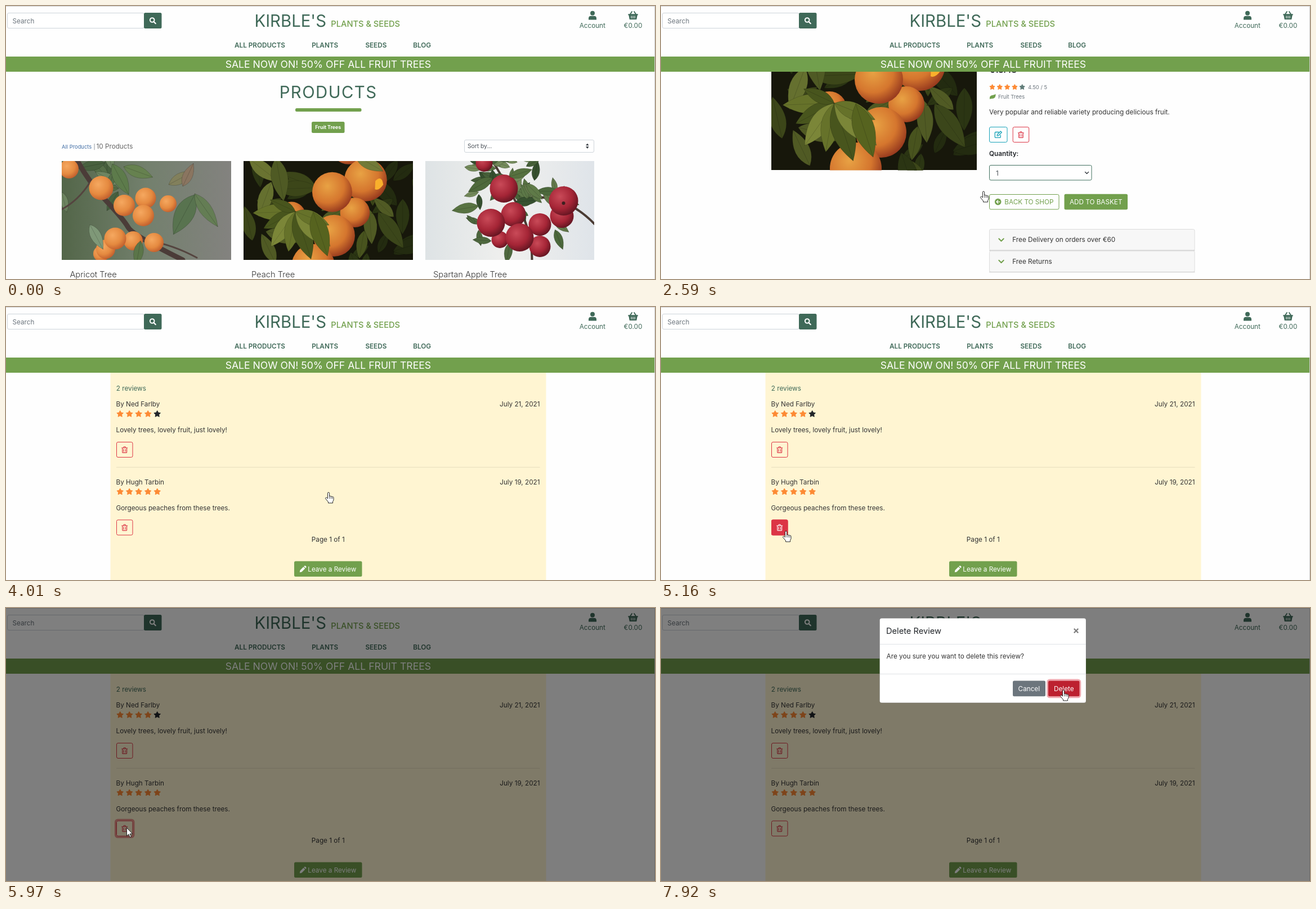
An HTML page that plays this animation: 1153 px wide and 486 px high, repeating every 7990 ms.

```html
<!DOCTYPE html>
<html lang="en">
<head>
<meta charset="utf-8">
<title>Plant shop</title>
<style>
html, body { margin: 0; width: 100%; height: 100%; overflow: hidden; background: #fefefe; }
svg { display: block; }
text { font-family: Inter, sans-serif; font-optical-sizing: none; white-space: pre; }
</style>
</head>
<body>
<svg id="stage" width="1153" height="486"></svg>
<script>
const LOOP = 7990, GREEN = '#72a04d', DARK = '#3f6958', RED = '#dc3545', GREY = '#6c757d', INK = '#333', ORANGE = '#fd8a34';

// ---- drawing helpers ----
const text = (x, y, s, fill = INK, size = 11.73, more = '') =>
  `<text x="${x}" y="${y}" fill="${fill}" font-size="${size}" ${more}>${s}</text>`;
const MID = 'text-anchor="middle"', END = 'text-anchor="end"';
const weight = w => `font-weight="${w}"`;
const rect = (x, y, w, h, fill, r = 0, more = '') =>
  `<rect x="${x}" y="${y}" width="${w}" height="${h}" rx="${r}" fill="${fill}" ${more}/>`;
const box = (x, y, w, h, line, fill = 'none') => rect(x + .5, y + .5, w - 1, h - 1, fill, 2.5, `stroke="${line}"`);
const line = (d, color, w = 1.2, more = '') =>
  `<path d="${d}" fill="none" stroke="${color}" stroke-width="${w}" stroke-linecap="round" stroke-linejoin="round" ${more}/>`;
const shape = (d, fill, more = '') => `<path d="${d}" fill="${fill}" ${more}/>`;
const group = (id, body, more = '') => `<g id="${id}" ${more}>${body}</g>`;
const photo = (x, y, w, h, view, body) =>
  `<svg x="${x}" y="${y}" width="${w}" height="${h}" viewBox="${view}" preserveAspectRatio="xMidYMid slice">${body}</svg>`;

const star = (x, y, r, fill) => {
  let d = '';
  for (let i = 0; i < 10; i++) {
    const a = (i / 5 - .5) * Math.PI, q = i % 2 ? r * .52 : r;
    d += `${i ? 'L' : 'M'}${(x + q * Math.cos(a)).toFixed(2)} ${(y + q * Math.sin(a)).toFixed(2)}`;
  }
  return shape(d + 'z', fill, `stroke="${fill}" stroke-linejoin="round"`);
};
const stars = (x, y, gap, r, full, rest) =>
  [0, 1, 2, 3, 4].map(i => star(x + i * gap, y, r, i < full ? ORANGE : rest)).join('');
const bin = (x, y, color) =>
  line(`M${x - 5} ${y - 3.3}h10M${x - 2} ${y - 3.3}l.7-1.9h2.6l.7 1.9M${x - 3.9} ${y - 3}v7.4q0 1 1 1h5.8q1 0 1-1v-7.4M${x - 1.7} ${y - .8}v4M${x + 1.7} ${y - .8}v4`, color, 1.1);
const binButton = (x, y) => box(x, y, 29.5, 28, RED) + bin(x + 14.7, y + 14, RED);

// ---- photographs as simple shapes ----
let seed = 7;
const rnd = () => (seed = seed * 16807 % 2147483647) / 2147483647;
const leaf = (x, y, l, a, c, w = l * .38) =>
  `<path transform="translate(${x} ${y})rotate(${a})" d="M0 0Q${l * .4} ${-w} ${l} 0Q${l * .4} ${w} 0 0H${l}" fill="${c}" stroke="#0003" stroke-width=".8"/>`;
const scatter = (n, x, y, w, h, len, colors) => {
  let s = '';
  while (n--) s += leaf(x + rnd() * w, y + rnd() * h, len * (.6 + rnd() * .6), rnd() * 360, colors[n % colors.length]);
  return s;
};
const fruit = (kind, list) => list.map(([x, y, r]) => `<circle cx="${x}" cy="${y}" r="${r}" fill="url(#${kind})"/>`).join('');
const radial = (id, a, b, c) =>
  `<radialGradient id="${id}" cx=".38" cy=".35" r=".7"><stop stop-color="${a}"/><stop offset=".6" stop-color="${b}"/><stop offset="1" stop-color="${c}"/></radialGradient>`;
const across = (id, a, b, c) =>
  `<linearGradient id="${id}"><stop stop-color="${a}"/><stop offset=".5" stop-color="${b}"/><stop offset="1" stop-color="${c}"/></linearGradient>`;

const apricots = rect(0, 0, 301, 176, 'url(#haze)') +
  scatter(9, 0, 0, 110, 60, 48, ['#566f49', '#48613f', '#6d8460']) +
  line('M28 0Q50 40 80 72T118 118T215 176', '#4b3c38', 9) + line('M0 86Q30 70 50 38M140 140Q190 145 240 172', '#54443f', 3) +
  leaf(90, 5, 62, 62, '#5d7b4b') + leaf(110, 10, 55, 20, '#66814f') + leaf(236, 60, 80, 118, '#58734f', 34) +
  leaf(236, 58, 72, 55, '#647d54', 22) + leaf(190, 42, 50, -28, '#82805c') + leaf(215, 45, 45, -65, '#8a7560') +
  fruit('apricot', [[13, 14, 17], [189, 76, 15], [70, 165, 14], [70, 48, 21.5], [149, 66, 18.5], [111, 79, 19], [145, 97, 19], [78, 157, 17], [127, 142, 17], [95, 138, 19.5], [164, 145, 17]]) +
  leaf(50, 113, 50, 62, '#7f9878') + leaf(140, 142, 45, 100, '#5b7549');

const peaches = rect(0, 0, 365, 243, '#17170b') +
  scatter(34, 0, 0, 365, 243, 75, ['#2b3513', '#3c4619', '#232b10', '#505a24']) +
  fruit('peach', [[226, -14, 36], [263, 56, 46], [240, 126, 32], [191, 82, 43], [195, 176, 45], [103, 134, 31], [150, 240, 46]]) +
  shape('M284 58q14-14 17 8q-10 14-18 10z', '#f9b02c') +
  leaf(12, 10, 82, 38, '#6a7331') + leaf(70, 8, 95, 80, '#4f5a24') + leaf(60, 60, 80, 110, '#65702f') + leaf(240, 2, 70, 30, '#717a38') +
  [[178, 92], [152, 78], [125, 92], [100, 88], [72, 108], [45, 106], [22, 78], [205, 60]]
    .map(([a, l], i) => leaf(112, 124, l, a, ['#66722a', '#48551d', '#7b8638'][i % 3])).join('') +
  leaf(150, 125, 100, 72, '#56631f') + leaf(260, 165, 62, 100, '#48531e') + leaf(290, 125, 95, 55, '#3b461a');

const apples = rect(0, 0, 301, 176, 'url(#cloud)') +
  line('M120 0Q150 50 170 90T190 176M190 65Q250 60 301 112', '#4a3b33', 4) +
  scatter(40, 70, 0, 125, 82, 36, ['#48623a', '#5d7848', '#36502f', '#758c5c']) +
  scatter(12, 180, 45, 70, 85, 34, ['#4c683c', '#63794b']) + scatter(5, 85, 110, 70, 40, 32, ['#4f693f']) +
  fruit('apple', [[105, 4, 15], [243, 98, 21], [204, 113, 20], [204, 152, 19], [133, 140, 15], [140, 49, 25], [246, 71, 26], [157, 95, 22], [117, 110, 25], [168, 136, 25]]) +
  leaf(150, 28, 42, -18, '#56713f') + leaf(120, 30, 50, 150, '#4e693b') + leaf(180, 40, 40, 45, '#5f7a48') + leaf(95, 80, 48, 170, '#587342') +
  `<circle cx="246" cy="75" r="3" fill="#3d2020"/>`;

const defs = `<defs>${radial('apricot', '#f5a860', '#e58a40', '#bf5c2c')}${radial('peach', '#e8a244', '#d5762e', '#93361d')}${radial('apple', '#c94a58', '#a52536', '#5f1420')}${across('haze', '#536649', '#73806d', '#83827f')}${across('cloud', '#dee3e5', '#f0f0ee', '#dfe4e9')}</defs>`;

// ---- pages ----
const shop =
  text(572.6, 164, 'PRODUCTS', DARK, 29.33, MID + ' letter-spacing="1.467"') + rect(514, 182, 117.5, 6, GREEN, 2.5) +
  rect(543, 206, 58.5, 20, GREEN, 2.5) + text(572.3, 219.3, 'Fruit Trees', '#fff', 8.8, MID + ' ' + weight(700)) +
  text(99, 253.5, 'All Products', '#426fa6', 9.39) + text(155.5, 253.5, '|', GREY, 9.39) + text(160.5, 253.5, '10 Products', '#666') +
  box(814, 238, 231, 23, '#ced4da', '#fff') + text(820, 253, 'Sort by...', '#495057', 10.27) +
  shape('M1030 248.3l2.8-3.6 2.8 3.6zM1030 250.3l2.8 3.6 2.8-3.6z', '#343a40') +
  photo(99, 276, 301, 176, '0 0 301 176', apricots) + photo(422, 276, 301, 176, '0 15 365 213.4', peaches) + photo(745, 276, 300, 176, '0 0 301 176', apples) +
  [[113.5, 'Apricot Tree'], [436, 'Peach Tree'], [759, 'Spartan Apple Tree']].map(([x, s]) => text(x, 483, s, INK, 14.67, weight(300))).join('') +
  group('lift', rect(421, 275, 303, 230, 'none', 2, 'stroke="#0002" stroke-width="2"'));

const fold = (y, s) => box(583, y, 365.5, 38.5, '#dcdcdc', '#f7f7f7') + rect(583, y + 37.5, 365.5, 1.3, '#d0d0d0') +
  line(`M600.3 ${y + 17.3}l4.2 4.2 4.2-4.2`, GREEN, 2) + text(624.3, y + 23, s);
const review = (y, name, date, score, words) =>
  text(195.5, y, 'By ' + name) + text(948.5, y, date, INK, 11.73, END) + stars(202.7, y + 13.2, 16.5, 6, score, '#212529') +
  text(195.5, y + 46, words) + binButton(196, y + 62.7);

const detail = photo(196, 153, 365, 243.5, '0 0 365 243.5', peaches) +
  text(582, 175.5, 'Peach Tree', DARK, 23.47) +
  text(583, 200, '€26.95', GREY, 11.73, 'text-decoration="line-through"') + text(626, 200, '50% off!', ORANGE, 11.73, weight(600)) +
  text(583, 223, '€13.48', '#212529', 14.67, weight(600)) +
  stars(588.5, 248.5, 13.3, 4.9, 4, '#607c78') + text(652, 251.7, '4.50 / 5', GREY, 9.39) +
  shape('M584 270q-1-6 4-7t6.5-2.500q1 9-8 8.500q-1.300 0-2.500 1z', GREEN) + text(599, 269, 'Fruit Trees', GREY, 9.39) +
  text(583, 297, 'Very popular and reliable variety producing delicious fruit.') +
  box(583, 319, 32.5, 28, '#17a2b8') +
  line('M600 328.500h-5.500q-1.200 0-1.200 1.200v7.500q0 1.200 1.200 1.200h7.500q1.200 0 1.200-1.200v-3.200M597.500 332.800l5.800-5.800 2 2-5.800 5.800-2.400.4z', '#17a2b8', 1.3) +
  binButton(624.7, 319) +
  text(583, 371, 'Quantity:', '#212529', 11.73, weight(600)) +
  box(583, 387, 182.5, 27.5, '#41705f', '#fff') + text(595, 405.5, '1', '#495057') + line('M753.5 399.500l3 3 3-3', '#343a40', 1.4) +
  box(583, 439, 124.5, 27.500, GREEN) + `<circle cx="598.700" cy="452.600" r="5.800" fill="${GREEN}"/>` + line('M601.700 452.600h-5.500M598.700 450l-2.600 2.600 2.600 2.600', '#fff', 1.4) +
  text(610.3, 456.8, 'BACK TO SHOP', GREEN) + rect(716.5, 438.7, 112.5, 27.8, GREEN, 2.5) + text(772.7, 456.8, 'ADD TO BASKET', '#fff', 11.73, MID) +
  fold(501, 'Free Delivery on orders over €60') + fold(539.5, 'Free Returns') +
  rect(185.5, 614, 774, 430, '#fff5d2') +
  text(572.6, 648.5, 'PRODUCT REVIEWS', DARK, 17.6, MID + ' letter-spacing=".98"') + rect(525, 660.3, 94, 3.7, GREEN, 1.8) +
  text(195.8, 700.5, '2 reviews', DARK) +
  review(729.3, 'Ned Farlby', 'July 21, 2021', 4, 'Lovely trees, lovely fruit, just lovely!') +
  rect(196, 836.8, 752.5, 1, '#0000001a') +
  review(867.8, 'Hugh Tarbin', 'July 19, 2021', 5, 'Gorgeous peaches from these trees.') +
  group('ring', rect(194.5, 929, 32.5, 31, 'none', 4, `stroke="${RED}" stroke-opacity=".5" stroke-width="3"`)) +
  group('hot', rect(196, 930.5, 29.5, 28, RED, 2.5) + bin(210.7, 944.5, '#fff')) +
  text(572.3, 970.2, 'Page 1 of 1', INK, 11.73, MID) +
  rect(512, 1004.5, 120.5, 27.5, GREEN, 2.5) + text(536.3, 1022.7, 'Leave a Review', '#fff') +
  shape('M521.800 1024.200l.7-3.600 6-6 2.900 2.900-6 6zM529.300 1013.800l1.100-1.100q.8-.6 1.500 0l1.400 1.400q.6.8 0 1.500l-1.100 1.100z', '#fff');

const header = rect(0, 0, 1153, 117, '#fefefe') + rect(0, 90, 1153, 27, GREEN) +
  box(2, 12, 244, 28, '#ced4da', '#fff') + text(11.5, 30.5, 'Search', GREY) + rect(245, 12, 31.5, 28, DARK, 2.5) +
  text(441.5, 37, "KIRBLE'S", DARK, 29.33) + text(577.3, 37, 'PLANTS &amp; SEEDS', GREEN, 14.67, weight(500)) +
  [[406, 'ALL PRODUCTS'], [543.2, 'PLANTS'], [638.4, 'SEEDS'], [723.3, 'BLOG']].map(([x, s]) => text(x, 74.3, s, DARK, 11.73, weight(600))).join('') +
  text(572.4, 110, 'SALE NOW ON! 50% OFF ALL FRUIT TREES', '#fff', 17.6, MID) +
  text(1041.8, 39, 'Account', DARK, 11.73, MID) + text(1114, 39, '€0.00', DARK, 11.73, MID) +
  group('icons', `<circle cx="259.700" cy="25" r="3.800" fill="none" stroke="#fff" stroke-width="2"/>` + line('M262.800 28.200l3 3', '#fff', 2.2) +
    `<circle cx="1042" cy="12.700" r="4" fill="${DARK}"/>` + shape('M1035 24.500v-2.500q0-4.300 4.300-4.300h5.400q4.300 0 4.300 4.300v2.500z', DARK) +
    shape('M1105.300 14.300h17.400v2h-1l-1.500 7.700h-12.400l-1.500-7.700h-1z', DARK) + line('M1109 14.500l3-4.500M1119 14.500l-3-4.500', DARK, 1.8) + line('M1111 17.800v3.800M1114 17.800v3.800M1117 17.800v3.800', '#fff', 1.1));

const modal = rect(388.5, 18.3, 366.5, 150.5, '#fff', 3.5, 'stroke="#0003" stroke-width=".7"') +
  rect(389, 64, 366, 1, '#dee2e6') + rect(389, 117, 366, 1, '#dee2e6') +
  text(400, 46, 'Delete Review', '#212529', 14.67) + text(737.6, 46, '×', '#7f7f7f', 17.6, MID + ' ' + weight(700)) +
  text(400.6, 90, 'Are you sure you want to delete this review?') +
  rect(625, 129.5, 58, 27.8, GREY, 2.5) + text(653.8, 148, 'Cancel', '#fff', 11.73, MID) +
  group('focus', rect(686.7, 128, 58, 30.8, 'none', 4, 'stroke="#e15361" stroke-opacity=".5" stroke-width="3"')) +
  `<rect id="del" x="688" y="129.500" width="55.500" height="27.800" rx="2.500"/>` + text(715.8, 148, 'Delete', '#fff', 11.73, MID);

const tip = rect(230, 381, 76, 22, '#000', 3, 'opacity=".9"') + shape('M225.700 392l4.400-4v8z', '#000', 'opacity=".9"') +
  text(268, 396, 'Delete Review', '#fff', 9.8, MID + ' style="font-family:\'Open Sans\',sans-serif"');

const pointer = 'stroke="#111" stroke-width=".9" stroke-linejoin="round"';
const cursor =
  group('arrow', shape('M0 0V14.500L3.400 11.300 5.800 16.800 8 15.800 5.600 10.600H10.200z', '#fff', pointer)) +
  group('hand', shape('M-1.600 11V1.600a1.600 1.600 0 0 1 3.200 0V7a1.500 1.500 0 0 1 2.600.5a1.500 1.500 0 0 1 2.500.7a1.400 1.400 0 0 1 2.300 1.200V13.500L7.500 16.500V19H-.5V17L-5.300 11.200a1.400 1.400 0 0 1 2-1.800z', '#fff', pointer) +
    line('M1.600 7.500v3.500M4.200 8v3M6.700 8.800v2.500', '#111', .7));

stage.innerHTML = defs + group('shop', shop) + group('detail', detail) + header +
  rect(0, 0, 1153, 1, '#cfcfcf') + rect(1152, 0, 1, 486, '#cfcfcf') +
  `<rect id="shade" width="1153" height="486"/>` + group('modal', modal) + group('tip', tip) + group('cursor', cursor);

// ---- motion ----
const $ = id => document.getElementById(id);
const show = (id, on) => $(id).style.display = on ? '' : 'none';
// progress in n equal jumps, the first at a and the last at b
const jumps = (t, a, b, n) => t < a ? 0 : Math.min(1, Math.floor((t - a) / (b - a) * (n - 1) + 1.001) / n);
const smooth = p => p * p * (3 - 2 * p);
const easeOut = p => 1 - (1 - p) ** 1.2;

const wheel = [[2460, 2670, 4, 184], [2930, 3200, 5, 184], [3390, 3540, 3, 92], [3870, 4010, 3, 92]];
const moves = [[110, 860, 12, 563, 254], [920, 1260, 6, 573, 330], [4660, 5050, 6, 228, 401], [5130, 5280, 3, 205, 393],
  [5900, 6450, 9, 280, 380], [6500, 7240, 12, 715, 166], [7310, 7590, 5, 715, 146]];

function draw(now) {
  const t = now % LOOP, within = (a, b) => t >= a && t < b;
  show('shop', t < 1870);
  show('detail', t >= 1870);
  show('icons', !within(1870, 1940));
  show('lift', within(1050, 1870));

  const scroll = wheel.reduce((y, [a, b, n, d]) => y + d * easeOut(jumps(t, a, b, n)), 0);
  $('detail').setAttribute('transform', `translate(0 ${-Math.round(scroll)})`);

  show('hot', within(5130, 5900));
  show('ring', within(5690, 6000));
  show('tip', within(5280, 5970));

  $('shade').setAttribute('opacity', jumps(t, 5830, 5970, 3) / 2);
  const open = easeOut(jumps(t, 6040, 6300, 5));
  $('modal').setAttribute('opacity', open);
  $('modal').setAttribute('transform', `translate(0 ${-36.7 * (1 - open)})`);
  $('del').setAttribute('fill', t >= 7850 ? '#bd2130' : t >= 7450 ? '#c82333' : RED);
  show('focus', t >= 7850);

  let x = 1094, y = 485;
  for (const [a, b, n, tx, ty] of moves) {
    const p = smooth(jumps(t, a, b, n));
    x += (tx - x) * p;
    y += (ty - y) * p;
  }
  const hand = within(1050, 4660) || within(5130, 5690) || t >= 7450;
  show('cursor', t >= 110);
  show('hand', hand);
  show('arrow', !hand);
  $('cursor').setAttribute('transform', `translate(${x} ${y})`);
}
const start = performance.now();
(function tick() {
  draw(performance.now() - start);
  requestAnimationFrame(tick);
})();
</script>
</body>
</html>
```
